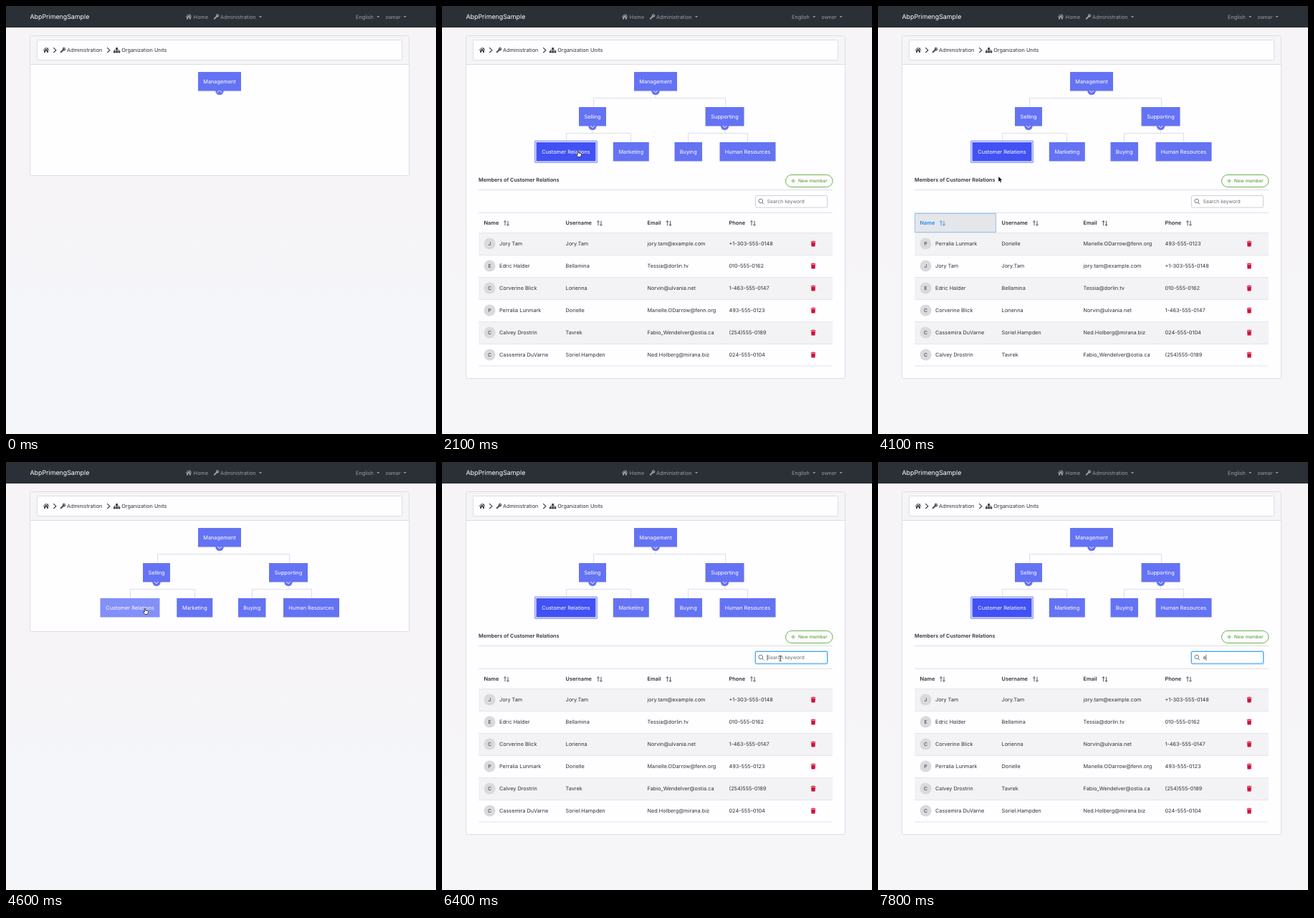
An HTML page with a canvas that plays this animation: 600 by 597 pixels, repeating every 8 s.

```html
<!DOCTYPE html>
<html lang="en">
<head>
<meta charset="utf-8">
<title>Organization units</title>
<style>
html, body { margin: 0; width: 100%; height: 100%; overflow: hidden; background: #f6f4f7; }
canvas { display: block; width: 100vw; height: 100vh; }
</style>
</head>
<body>
<canvas id="stage" width="600" height="597"></canvas>
<script>
const ctx = document.getElementById('stage').getContext('2d');
const LOOP = 8000, STEP = 100;
const FONT = 'Inter, Roboto, sans-serif';
const INK = '#303238', LINE = '#dfdee2', WHITE = '#fefdff';
const BLUE = '#6473f3', ACTIVE = '#4151f4', HOVER = '#8290f8';

const members = [
  ['Jory Tam', 'Jory.Tam', 'jory.tam@example.com', '+1-303-555-0148'],
  ['Edric Halder', 'Bellamina', 'Tessia@dorlin.tv', '010-555-0162'],
  ['Corverine Blick', 'Lorienna', 'Norvin@ulvania.net', '1-463-555-0147'],
  ['Perralia Lunmark', 'Dorielle', 'Marielle.ODarrow@fenn.org', '493-555-0123'],
  ['Calvey Drostrin', 'Tavrek', 'Fabio_Wendelver@ostia.ca', '(254)555-0189'],
  ['Cassemira DuVarne', 'Soriel.Hampden', 'Ned.Holberg@mirana.biz', '024-555-0104']
];

// label, x, y, width, moves slightly when the table opens
const nodes = [
  ['Management', 268, 92, 60, 0],
  ['Selling', 191, 141, 38, 0],
  ['Supporting', 367, 141, 54, 1],
  ['Customer Relations', 131.5, 190, 83, 0],
  ['Marketing', 238.3, 190, 50, 1],
  ['Buying', 324, 190, 38.5, 1],
  ['Human Resources', 387, 190, 78, 1]
];

const columns = [['Name', 58.5, 90], ['Username', 172.5, 220], ['Email', 286.5, 316.5], ['Phone', 400.5, 434]];

// time, x, y of the pointer's hot spot
const path = [
  [100, 598, 62], [800, 297, 117], [1100, 297, 117], [1300, 285.5, 126.5],
  [1700, 187, 202], [2100, 190, 202.5], [2300, 186, 206], [2400, 186, 206],
  [2900, 122.5, 300.5], [3800, 122.5, 300.5], [4300, 193, 204], [4600, 194, 204.5],
  [5500, 192, 203], [6200, 472, 274], [6600, 472, 274]
];

const typed = [[6600, 'e'], [6700, 'er'], [6800, 'err'], [6900, 'erra'], [7300, 'err'], [7400, 'er'], [7600, 'e']];

function text(s, x, y, size = 7.3, color = INK, weight = 400, align = 'left') {
  ctx.font = `${weight} ${size}px ${FONT}`;
  ctx.fillStyle = color;
  ctx.textAlign = align;
  ctx.fillText(s, x, y + size * 0.36);
}

function box(x, y, w, h, fill, stroke, radius = 0, width = 1) {
  ctx.beginPath();
  ctx.roundRect(x, y, w, h, radius);
  if (fill) { ctx.fillStyle = fill; ctx.fill(); }
  if (stroke) { ctx.strokeStyle = stroke; ctx.lineWidth = width; ctx.stroke(); }
}

function poly(points, color, width = 1, fill = false) {
  ctx.beginPath();
  points.forEach(([x, y], i) => i ? ctx.lineTo(x, y) : ctx.moveTo(x, y));
  if (fill) { ctx.closePath(); ctx.fillStyle = color; ctx.fill(); }
  else { ctx.strokeStyle = color; ctx.lineWidth = width; ctx.stroke(); }
}

function disc(x, y, r, color) {
  ctx.beginPath();
  ctx.arc(x, y, r, 0, Math.PI * 2);
  ctx.fillStyle = color;
  ctx.fill();
}

function at(x, y, draw) {
  ctx.save();
  ctx.translate(x, y);
  draw();
  ctx.restore();
}

function home(x, y, color) {
  at(x, y, () => {
    poly([[-4.2, 0.2], [0, -3.3], [4.2, 0.2]], color, 1);
    poly([[2.3, -3.2], [2.3, -1.2]], color, 1.1);
    poly([[-3, 0.4], [0, -2.1], [3, 0.4], [3, 3.5], [0.9, 3.5], [0.9, 1.3], [-0.9, 1.3], [-0.9, 3.5], [-3, 3.5]], color, 1, true);
  });
}

function wrench(x, y, color) {
  at(x, y, () => {
    ctx.lineCap = 'round';
    poly([[-2.7, 2.7], [1, -1]], color, 2);
    ctx.beginPath();
    ctx.arc(1.7, -1.7, 1.5, -0.25, Math.PI * 1.5 + 0.25);
    ctx.lineWidth = 1.4;
    ctx.stroke();
  });
}

function sitemap(x, y) {
  at(x, y, () => {
    ctx.fillStyle = INK;
    [[-1.4, -3.6], [-4.7, 1], [-1.4, 1], [1.9, 1]].forEach(([a, b]) => ctx.fillRect(a, b, 2.8, 2.6));
    poly([[-3.3, 1], [-3.3, -0.2], [3.3, -0.2], [3.3, 1]], INK, 0.7);
    poly([[0, -1], [0, 1]], INK, 0.7);
  });
}

function navCaret(x) {
  poly([[x - 2, 14], [x + 2, 14], [x, 16.2]], '#999ca1', 1, true);
}

function header() {
  const gray = '#999ca1';
  ctx.fillStyle = '#2b3037';
  ctx.fillRect(0, 0, 600, 30);
  text('AbpPrimengSample', 33.5, 15, 8.85, '#ffffff');
  home(255, 15, gray);
  text('Home', 261.5, 15, 7.3, gray);
  wrench(293.5, 15, gray);
  text('Administration', 299, 15, 7.3, gray);
  text('English', 488, 15, 7.3, gray);
  text('owner', 529.5, 15, 7.2, gray);
  [355, 519.3, 556.7].forEach(navCaret);
}

function card(bottom) {
  box(33.5, 41.5, 529, bottom - 41.5, WHITE, LINE, 2);
  ctx.fillStyle = '#f5f4f6';
  ctx.fillRect(34, 42, 528, 39);
  poly([[34, 81.5], [562, 81.5]], LINE);
  box(43.5, 47.5, 509, 28, WHITE, LINE, 1);
  home(56, 61.5, '#45474d');
  [68, 143].forEach(x => poly([[x - 1.8, 58.2], [x + 1.8, 61.7], [x - 1.8, 65.2]], INK, 1.1));
  wrench(79.3, 61.7, '#45474d');
  text('Administration', 85, 61.7, 7.25);
  sitemap(154.6, 61.7);
  text('Organization Units', 161.3, 61.7, 7.25);
}

function branch(top, y, left, right, bottom, mid) {
  poly([[mid, top], [mid, y]], LINE);
  poly([[left, bottom], [left, y], [right, y], [right, bottom]], LINE);
}

function toggle(x, y, open, focused) {
  ctx.save();
  if (!focused) {
    ctx.beginPath();
    ctx.rect(x - 8, y - 0.2, 16, 9);
    ctx.clip();
  } else {
    disc(x, y, 7.2, '#b9dcfb');
  }
  disc(x, y, 5.8, BLUE);
  const d = open ? 1.7 : -1.7;
  poly([[x - 3.3, y + 0.8 - d], [x, y + 0.8 + d], [x + 3.3, y + 0.8 - d]], '#ffffff', 1);
  ctx.restore();
}

function inside(p, x, y, w, h) {
  return p && p.x >= x && p.x <= x + w && p.y >= y && p.y <= y + h;
}

function tree(s) {
  const shift = s.selected ? 0.5 : 0;
  if (s.expanded) {
    branch(118, 128.5, 211.5, 395.5, 141, 298);
    branch(168, 177.5, 173.5, 263.5, 190, 210);
    branch(168, 177.5, 343.5, 426.5, 190, 394.5);
  }
  nodes.forEach(([label, x0, y, w, moves], i) => {
    if (i && !s.expanded) return;
    const x = x0 + moves * shift, chosen = i === 3 && s.selected;
    const hovered = i > 2 && inside(s.pointer, x, y, w, 26.5);
    if (chosen) box(x - 1.7, y - 1.7, w + 3.4, 29.9, WHITE, BLUE, 0, 1);
    box(x, y, w, 26.5, chosen ? ACTIVE : hovered ? HOVER : BLUE);
    text(label, x + w / 2, y + 13.2, 7.35, '#ffffff', 400, 'center');
    if (i < 3) toggle(x + w / 2, y + 26.3, s.expanded, i === 0 && s.toggleFocus);
  });
}

function sortIcon(x, y, color) {
  poly([[x - 2, y + 3.3], [x - 2, y - 3.3]], color, 0.8);
  poly([[x - 3.8, y - 1.6], [x - 2, y - 3.4], [x - 0.2, y - 1.6]], color, 0.8);
  poly([[x + 2, y - 3.3], [x + 2, y + 3.3]], color, 0.8);
  poly([[x + 0.2, y + 1.6], [x + 2, y + 3.4], [x + 3.8, y + 1.6]], color, 0.8);
}

function trash(x, y) {
  const red = '#d0103c';
  ctx.fillStyle = red;
  ctx.fillRect(x - 3.4, y - 3.2, 6.8, 1);
  ctx.fillRect(x - 1.3, y - 3.9, 2.6, 1);
  poly([[x - 2.9, y - 1.7], [x + 2.9, y - 1.7], [x + 2.5, y + 3.9], [x - 2.5, y + 3.9]], red, 1, true);
}

function searchBox(s) {
  if (s.focus) box(437.5, 264.5, 100, 16.5, null, '#b5dafc', 1.5, 3);
  box(437.5, 264.5, 100, 16.5, '#ffffff', s.focus ? '#51a9f3' : '#cfd0d5', 1.5);
  ctx.beginPath();
  ctx.arc(444.7, 272, 2.8, 0, Math.PI * 2);
  ctx.strokeStyle = '#55585e';
  ctx.lineWidth = 0.8;
  ctx.stroke();
  poly([[446.8, 274.1], [449, 276.4]], '#55585e', 0.9);
  text(s.query || 'Search keyword', 453.5, 273, 6.85, s.query ? INK : '#686b71');
  if (s.focus) {
    const x = 453.9 + (s.query ? ctx.measureText(s.query).width : 0);
    poly([[x, 268.8], [x, 277]], INK, 0.7);
  }
}

function table(s) {
  text('Members of Customer Relations', 51, 242, 7.25, INK, 600);
  box(479.5, 235.5, 65.5, 17, WHITE, '#6db350', 8.5);
  poly([[487, 244], [493, 244]], '#5da43e', 0.8);
  poly([[490, 241], [490, 247]], '#5da43e', 0.8);
  text('New member', 497, 244, 6.4, '#5da43e', 500);
  poly([[51, 256.5], [545, 256.5]], LINE);
  searchBox(s);
  poly([[51, 288.5], [545, 288.5]], LINE);
  if (s.sort) box(51.5, 289.5, 113, 26, '#e5e6ea', '#90c8f2');
  columns.forEach(([name, x, icon], i) => {
    const color = i === 0 && s.sort ? '#1d8cf0' : INK;
    text(name, x, 302.5, 7.35, color, 600);
    sortIcon(icon, 303, color);
  });
  s.rows.forEach((row, i) => {
    const y = 316 + i * 31, mid = y + 15.5;
    if (i % 2 === 0) {
      ctx.fillStyle = '#f3f2f4';
      ctx.fillRect(51, y, 494, 31);
    }
    poly([[51, y + 0.5], [545, y + 0.5]], '#e6e5e9');
    disc(66.5, mid, 8, '#d9dade');
    text(row[0][0], 66.5, mid, 6.9, INK, 400, 'center');
    row.forEach((cell, c) => text(cell, c ? columns[c][1] : 80, mid));
    trash(518, mid);
  });
  const end = 316.5 + s.rows.length * 31;
  poly([[51, end - 0.5], [545, end - 0.5]], '#e6e5e9');
}

function cursor(s) {
  const p = s.pointer;
  if (!p) return;
  const overNode = s.expanded && nodes.slice(3).some(([, x, y, w]) => inside(p, x, y, w, 26.5));
  const hand = overNode || inside(p, 291, 112, 14, 13) || s.selected && inside(p, 51, 289, 494, 27);
  at(p.x, p.y, () => {
    ctx.lineJoin = 'round';
    if (s.selected && inside(p, 437, 264, 101, 17)) {
      poly([[-1.7, -4], [0, -3.2], [1.7, -4]], '#222', 0.8);
      poly([[0, -3.2], [0, 3.2]], '#222', 0.8);
      poly([[-1.7, 4], [0, 3.2], [1.7, 4]], '#222', 0.8);
    } else if (hand) {
      const shape = [[-0.7, 0], [0.6, 0], [0.8, 2.6], [3.6, 3.2], [4.5, 4.1], [4, 6.6], [3.3, 8], [-0.2, 8], [-2.6, 4.8], [-2, 4.1], [-0.7, 5]];
      poly(shape, '#ffffff', 1, true);
      poly([...shape, shape[0]], '#222', 0.8);
    } else {
      const shape = [[0, 0], [0, 7], [1.6, 5.6], [2.7, 8.2], [3.8, 7.7], [2.7, 5.2], [4.9, 5.1]];
      poly([...shape, shape[0]], '#ffffff', 1.2);
      poly(shape, '#111', 1, true);
    }
  });
}

function pointerAt(t) {
  if (t < path[0][0] || t >= path[path.length - 1][0]) return null;
  const i = path.findIndex(k => k[0] > t);
  const [t0, x0, y0] = path[i - 1], [t1, x1, y1] = path[i];
  const u = (t - t0) / (t1 - t0), e = u * u * (3 - 2 * u);
  return { x: x0 + (x1 - x0) * e, y: y0 + (y1 - y0) * e };
}

function stateAt(t) {
  const query = typed.reduce((q, [from, word]) => t >= from ? word : q, '');
  const sort = t >= 3000 && t < 4400 ? (t < 3700 ? 1 : -1) : 0;
  const rows = members.filter(m => m.join(' ').toLowerCase().includes(query));
  if (sort) rows.sort((a, b) => sort * a[0].localeCompare(b[0]));
  return {
    query, sort, rows,
    expanded: t >= 1000,
    toggleFocus: t >= 1000 && t < 1800,
    selected: t >= 1800 && t < 4400 || t >= 5300,
    focus: t >= 6400,
    pointer: pointerAt(t)
  };
}

function background(short) {
  const g = ctx.createLinearGradient(0, 300, 0, 440);
  g.addColorStop(0, '#f6f4f7');
  g.addColorStop(1, short ? '#f4f6fa' : '#f6f5f7');
  ctx.fillStyle = g;
  ctx.fillRect(0, 0, 600, 597);
}

function frame(now) {
  const t = Math.floor(now % LOOP / STEP) * STEP;
  const s = stateAt(t);
  ctx.textBaseline = 'alphabetic';
  ctx.textRendering = 'geometricPrecision';
  background(!s.selected);
  header();
  card(s.selected ? 333.5 + s.rows.length * 31 : 236.5);
  tree(s);
  if (s.selected) table(s);
  cursor(s);
  requestAnimationFrame(frame);
}
requestAnimationFrame(frame);
</script>
</body>
</html>
```
